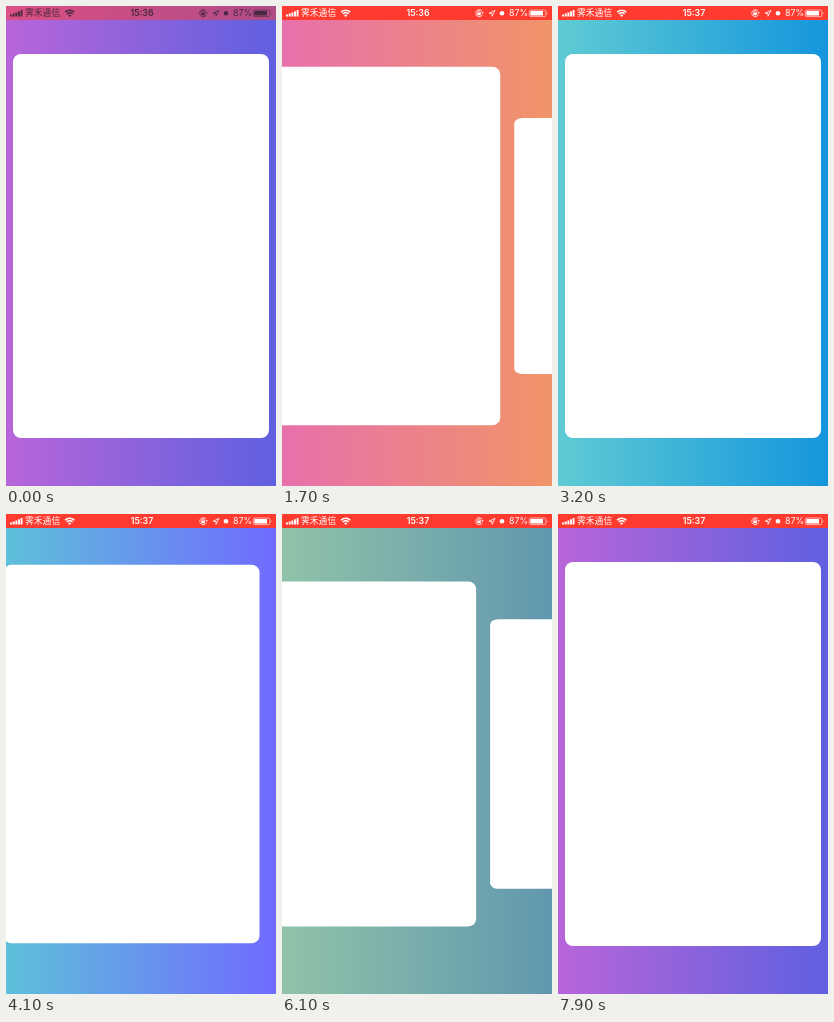
Write an HTML page that moves like this. It is 270 by 480 pixels and loops after 8 s.

```html
<!DOCTYPE html>
<html lang="zh">
<head>
<meta charset="utf-8">
<title>Card carousel</title>
<style>
  html, body { margin: 0; width: 100%; height: 100%; overflow: hidden; }
  svg { display: block; width: 270px; height: 480px; }
  text { font: 8.8px Inter, "Noto Sans CJK SC", "Noto Sans CJK", sans-serif; }
  #clock { font-weight: 600; text-anchor: middle; }
  .line { fill: none; stroke: currentColor; }
</style>
</head>
<body>
<svg viewBox="0 0 270 480">
  <g id="cards" fill="#fff"></g>
  <rect id="bar" width="270" height="14" fill="#ff3b30"/>
  <g id="status" fill="currentColor">
    <path d="M4 8.5h2v2h-2zM6.7 7.6h2v2.9h-2zM9.4 6.5h2v4h-2zM12.1 5.3h2v5.2h-2zM14.7 4h1.8v6.5h-1.8z"/>
    <text x="19" y="10.4">霁禾通信</text>
    <g class="line" stroke-width="1.4">
      <path d="M59 6.2a6.6 6.6 0 0 1 9.4 0M60.8 8a4 4 0 0 1 5.8 0"/>
    </g>
    <path d="M63.7 11l-1.6-1.7a2.3 2.3 0 0 1 3.2 0z"/>
    <text id="clock" x="136" y="10.4"></text>
    <path class="line" d="M200.2 5.2a3.5 3.5 0 1 0 .2 3.6M196 7v-1a1.1 1.1 0 0 1 2.2 0v1" stroke-width=".8"/>
    <path d="M195.4 6.7h3.4v2.5h-3.4zM199.2 6.2h2.6l-1.3 1.8z"/>
    <path class="line" d="M207 7.3l6-3-3 6v-3z" stroke-width=".8"/>
    <circle cx="220" cy="7.2" r="2.3"/>
    <text x="227" y="10.4">87%</text>
    <rect class="line" x="247.3" y="4" width="16.6" height="6.6" rx="1.5" stroke-width=".6"/>
    <path d="M248.4 5.1h12.6v4.4h-12.6zM264.8 6.2q1.4 1.1 0 2.2z"/>
  </g>
</svg>
<script>
const LOOP = 8000, PAGE = 270, SWIPE = 800, BG_LAG = 150;

// Left and right gradient colours of each page
const pages = [
  [[184, 101, 217], [95, 96, 224]],
  [[232, 112, 172], [240, 148, 104]],
  [[236, 180, 88], [238, 152, 86]],
  [[94, 203, 213], [20, 150, 222]],
  [[94, 192, 218], [112, 107, 255]]
];
const forward = [650, 1562, 2432, 3220];
const back = [4950, 5739, 6480, 7080];

const $ = id => document.getElementById(id);
const clamp = x => Math.max(0, Math.min(1, x));
const mix = (a, b, k) => a + (b - a) * k;
const rgb = c => `rgb(${c.map(Math.round)})`;

const swipe = (t, start) => 1 - (1 - clamp((t - start) / SWIPE) ** 2) ** 6;
const total = (t, starts) => starts.reduce((sum, s) => sum + swipe(t, s), 0);
const bounce = t => 0.25 * Math.sin(Math.PI * clamp((t - 3990) / 900)) ** 2;
const pageAt = t => total(t, forward) - total(t, back);

const cards = pages.map(() => {
  const r = document.createElementNS("http://www.w3.org/2000/svg", "rect");
  r.setAttribute("width", 256);
  r.setAttribute("rx", 8);
  return $("cards").appendChild(r);
});

function draw(t) {
  const pos = pageAt(t) + bounce(t);
  cards.forEach((card, i) => {
    const scale = Math.max(0, 1 - 0.4 * Math.abs(i - pos));
    card.setAttribute("x", 7 + (i - pos) * PAGE);
    card.setAttribute("y", 240 - 192 * scale);
    card.setAttribute("height", 384 * scale);
    card.setAttribute("ry", 8 * scale);
  });

  const p = Math.max(0, Math.min(4, pageAt(t - BG_LAG)));
  const i = Math.min(3, Math.floor(p));
  const [left, right] = [0, 1].map(side =>
    rgb(pages[i][side].map((c, n) => mix(c, pages[i + 1][side][n], p - i))));
  document.body.style.background = `linear-gradient(90deg, ${left}, ${right})`;

  // The status bar lights up in two hard steps
  const lit = Math.min(2, Math.floor(t / 100)) / 2;
  $("bar").setAttribute("opacity", mix(0.5, 1, lit));
  $("status").style.color = rgb([75, 40, 65].map(c => mix(c, 255, lit)));
  $("clock").textContent = t < 2100 ? "15:36" : "15:37";
}

let begin;
function frame(now) {
  begin ??= now;
  draw((now - begin) % LOOP);
  requestAnimationFrame(frame);
}
draw(0);
requestAnimationFrame(frame);
</script>
</body>
</html>
```
